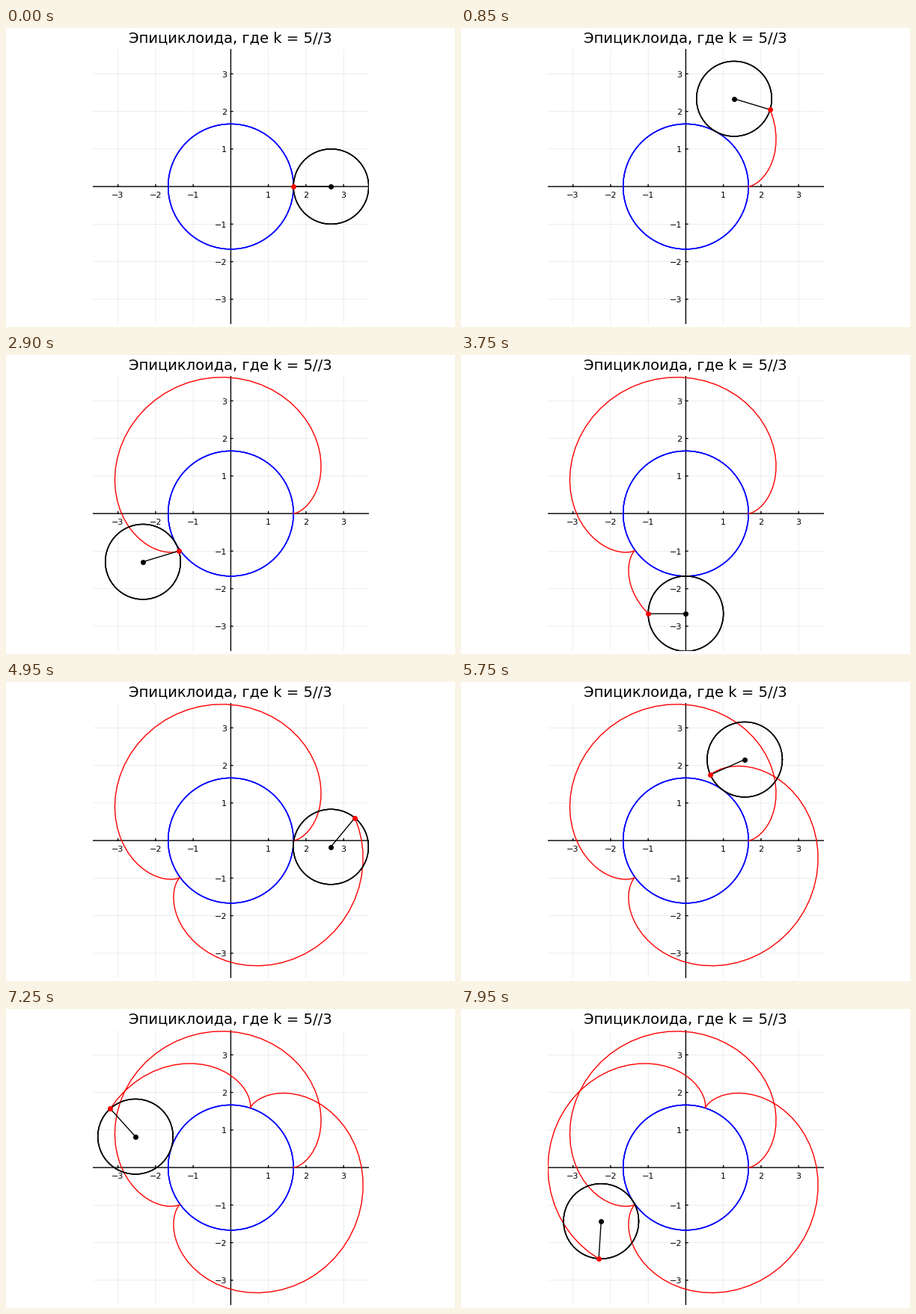
Recreate the animation shown at these times as a matplotlib script. Size 600 by 400 pixels, loop 8 s.

```python
import numpy as np
import matplotlib.pyplot as plt
from matplotlib.animation import FuncAnimation

W, H, DPI = 600, 400, 100
CX, CY, UNIT = 300.4, 212.1, 50.25   # origin and unit length in pixels
R, r = 5 / 3, 1.0
LIM = R + 2 * r
STEP = 2 * np.pi / 100
FRAMES, INTERVAL = 160, 50


def pt(px):
    return px * 72 / DPI


LW = pt(1.39)

plt.rcParams["font.family"] = "DejaVu Sans"
fig = plt.figure(figsize=(W / DPI, H / DPI), dpi=DPI, facecolor="white")
half = LIM * UNIT
ax = fig.add_axes([(CX - half) / W, 1 - (CY + half) / H, 2 * half / W, 2 * half / H])
ax.set_xlim(-LIM, LIM)
ax.set_ylim(-LIM, LIM)
ax.axis("off")


def line(x, y, color="black", lw=LW, z=3, **kw):
    return ax.plot(x, y, color=color, lw=lw, zorder=z, snap=False, **kw)[0]


def label(text, x, y, dx, dy, ha):
    ax.annotate(text, (x, y), xytext=(pt(dx), pt(dy)), textcoords="offset points",
                ha=ha, va="baseline", fontsize=8, zorder=2.5, annotation_clip=False)


# Grid, ticks and axes through the origin
tick = 2.5 / UNIT
span = [-LIM, LIM]
for v in (-3, -2, -1, 1, 2, 3):
    name = str(v).replace("-", "\u2212")
    line([v, v], span, lw=pt(0.7), z=1, alpha=0.1)
    line(span, [v, v], lw=pt(0.7), z=1, alpha=0.1)
    line([v, v], [0, tick], z=2)
    line([0, tick], [v, v], z=2)
    label(name, v, 0, -0.2, -15.05, "center")
    label(name, 0, v, -5.2, -4.6, "right")
line(span, [0, 0], z=2)
line([0, 0], span, z=2)
fig.text(300.2 / W, 1 - 19.3 / H, "Эпициклоида, где k = 5//3",
         ha="center", va="baseline", fontsize=14)

# Both circles are traced three times over, which hardens their edges
turn = np.arange(101) * STEP
ux, uy = np.cos(turn), np.sin(turn)
for _ in range(3):
    line(R * ux, R * uy, "blue")

t = np.arange(FRAMES) * STEP
cx, cy = (R + r) * np.cos(t), (R + r) * np.sin(t)
px = cx - r * np.cos((R / r + 1) * t)
py = cy - r * np.sin((R / r + 1) * t)

trail = line([], [], "red", z=4)
rollers = [line([], [], z=5) for _ in range(3)]
arm = line([], [], z=6)
dot = dict(marker="o", ms=pt(7), mew=0, ls="none", clip_on=False)
hub = line([], [], z=7, **dot)
pen = line([], [], "red", z=8, **dot)


def draw(i):
    trail.set_data(px[:i + 1], py[:i + 1])
    for circle in rollers:
        circle.set_data(cx[i] + r * ux, cy[i] + r * uy)
    arm.set_data([cx[i], px[i]], [cy[i], py[i]])
    hub.set_data([cx[i]], [cy[i]])
    pen.set_data([px[i]], [py[i]])
    return [trail, *rollers, arm, hub, pen]


anim = FuncAnimation(fig, draw, frames=FRAMES, interval=INTERVAL,
                     init_func=lambda: draw(0), repeat=True, repeat_delay=0)
plt.show()
```
